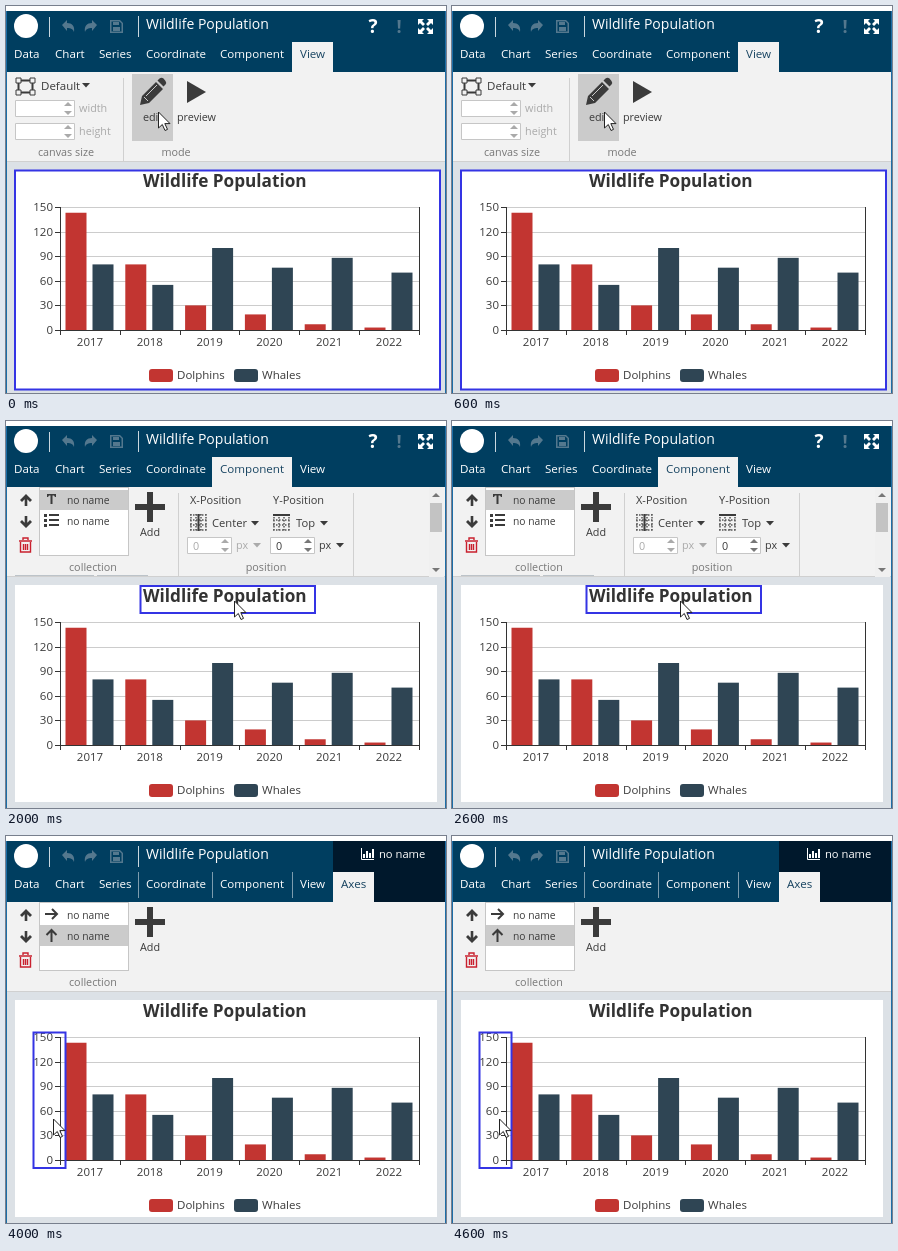
An HTML page that plays this animation: 440x387 px, repeating every 5 s.

```html
<!DOCTYPE html>
<html lang="en">
<head>
<meta charset="utf-8">
<title>Chart editor</title>
<style>
html, body { margin: 0; width: 100%; height: 100%; overflow: hidden; background: #fff; }
svg { display: block; width: 440px; height: 387px; font: 10.8px "Open Sans", "Noto Sans", sans-serif; fill: #3b3b3b; }
.tabs { font-size: 11.6px; }
.white { fill: #fff; }
.group { fill: #777; }
.off { fill: #aaa; }
.mid { text-anchor: middle; }
.field { fill: #fff; stroke: #c6c6c6; }
.line { fill: none; stroke: #3b3b3b; stroke-width: 2; }
.rule { fill: none; stroke: #d0d0d0; }
.pick { fill: none; stroke: #3434e4; stroke-width: 2; }
.hover { fill: none; stroke: #c8c8f6; stroke-width: 2; }
</style>
</head>
<body>
<svg viewBox="0 0 440 387">
  <defs>
    <path id="caret" d="M0 0h8l-4 4.5z"/>
    <path id="spin" d="M0 5l4-4 4 4zM0 10h8l-4 4z"/>
    <path id="up" d="M6 0l6 6-2 2-2.7-2.700V12H4.700V5.300L2 8 0 6z"/>
    <path id="undo" d="M0 5l5-5v3c5 0 8 3 7 9-1-3-3-4-7-4v3z"/>
    <g id="grid">
      <path d="M0 1H17M0 6H17M0 11H17M0 16H17M1 0V17M6 0V17M11 0V17M16 0V17" fill="none" stroke="#555" stroke-width="1.500" stroke-dasharray="1.500 1.500"/>
    </g>
  </defs>

  <!-- window -->
  <rect width="440" height="387" fill="#dce1e6"/>
  <rect width="440" height="5" fill="#fff"/>
  <rect y="5" width="440" height="61" fill="#003e60"/>
  <rect y="66" width="440" height="90" fill="#f2f2f2"/>
  <path d="M0 155.500H440" class="rule"/>
  <path d="M.5 5V387M439.500 5V387" fill="none" stroke="#1c6ea8"/>

  <!-- title bar -->
  <circle cx="20" cy="20" r="12" class="white"/>
  <path d="M43.500 11V31M132.500 10V31" stroke="#c9d7df"/>
  <g fill="#54788e">
    <use href="#undo" x="56" y="14"/>
    <use href="#undo" transform="matrix(-1 0 0 1 91 14)"/>
    <path d="M104 14h10l3 3v10h-13zM105.500 15.500v10h10v-8l-2-2zM107 15h6v4h-6zM107 21h7v5h-7z" fill-rule="evenodd"/>
    <text x="393" y="27" font-size="18" font-weight="700" class="mid">!</text>
  </g>
  <text x="140" y="23" font-size="14" class="white">Wildlife Population</text>
  <g data-s="0123">
    <text x="367" y="27" font-size="19" font-weight="700" class="mid white">?</text>
    <path d="M412 13h6l-2 2 3 3-2 2-3-3-2 2zM427 13v6l-2-2-3 3-2-2 3-3-2-2zM427 28h-6l2-2-3-3 2-2 3 3 2-2zM412 28v-6l2 2 3-3 2 2-3 3 2 2z" class="white"/>
  </g>
  <g data-s="4">
    <rect x="327" y="5" width="112" height="61" fill="#00182c"/>
    <path d="M355.500 12V23.500H368" fill="none" stroke="#fff"/>
    <path d="M357 18h2v4h-2zM360 15h2v7h-2zM363 17h2v5h-2zM366 13h2v9h-2z" class="white"/>
    <text x="373" y="22" font-size="11.200" class="white">no name</text>
    <path d="M132.500 36V62M206.500 36V62M286.500 36V62" stroke="#7d9cae"/>
  </g>

  <!-- tabs -->
  <rect data-s="01" x="286" y="36" width="41" height="31" fill="#f2f2f2"/>
  <rect data-s="23" x="206" y="36" width="80" height="31" fill="#f2f2f2"/>
  <rect data-s="4" x="327" y="36" width="41" height="31" fill="#f2f2f2"/>
  <g id="tabs" class="tabs"></g>

  <!-- view ribbon -->
  <g data-s="01">
    <path d="M12.500 74.500h14v12h-14z" class="line" stroke-width="1.500"/>
    <path d="M10 72h5v5h-5zM24 72h5v5h-5zM10 84h5v5h-5zM24 84h5v5h-5z" fill="#f2f2f2" stroke="#3b3b3b"/>
    <text x="35" y="84" font-size="11.500">Default</text>
    <use href="#caret" x="76" y="77"/>
    <path d="M9.500 94.500h59v16h-59zM9.500 117.500h59v16h-59z" class="field"/>
    <g class="off">
      <use href="#spin" x="58" y="95"/>
      <use href="#spin" x="58" y="118"/>
      <text x="73" y="106">width</text>
      <text x="73" y="129">height</text>
    </g>
    <g class="group mid">
      <text x="60" y="150">canvas size</text>
      <text x="170" y="150">mode</text>
    </g>
    <path d="M117.500 72V156" class="rule"/>
    <rect x="126" y="68" width="41" height="67" fill="#cbcbcb"/>
    <path d="M134 99l2-9 14-14 7 7-14 14zM151.500 74.500l2-2q2-1.500 4 0l2 2.500q1.500 2 0 3.500l-2 2z"/>
    <path d="M138 91l4 4M140 90l11-11" stroke="#cbcbcb"/>
    <path d="M181 75l19 11-19 11z"/>
    <text x="146.500" y="115" class="mid">edit</text>
    <text x="190.500" y="115" class="mid">preview</text>
  </g>

  <!-- collection ribbon -->
  <g data-s="234">
    <use href="#up" x="14" y="73"/>
    <use href="#up" transform="matrix(1 0 0 -1 14 107)"/>
    <path d="M13 120h13M17 119v-2h5v2M14.500 121v10h10v-10M17.500 123v6M19.500 123v6M21.500 123v6" fill="none" stroke="#c9202e" stroke-width="1.400"/>
    <rect x="33.500" y="66.500" width="89" height="68" class="field"/>
    <rect data-s="23" x="34" y="69" width="88" height="20" fill="#cbcbcb"/>
    <rect data-s="4" x="34" y="89" width="88" height="21" fill="#cbcbcb"/>
    <g data-s="23">
      <path d="M41 73h9v3h-1l-1-1.500h-1.500v8.500h-2v-8.500h-1.500l-1 1.500h-1z"/>
      <path d="M38 93h3v3h-3zM38 98h3v3h-3zM38 103h3v3h-3zM43 93h10v2h-10zM43 98h10v2h-10zM43 103h10v2h-10z"/>
    </g>
    <g data-s="4">
      <path d="M39 78h11M46 73l5 5-5 5M45.500 106v-11M40.500 99l5-5 5 5" class="line"/>
    </g>
    <text x="61" y="83" font-size="10.300">no name</text>
    <text x="61" y="104" font-size="10.300">no name</text>
    <path d="M141 71h6v12h12v6h-12v12h-6v-12h-12v-6h12z"/>
    <text x="144" y="115" class="mid">Add</text>
    <text x="87" y="150" class="group mid">collection</text>
  </g>

  <!-- position ribbon -->
  <g data-s="23">
    <path d="M172.500 72V156M347.500 72V156" class="rule"/>
    <path d="M9 154.500H88M91 154.500H142" stroke="#bcc3c9"/>
    <text x="184" y="83" font-size="11">X-Position</text>
    <text x="267" y="83" font-size="11">Y-Position</text>
    <use href="#grid" x="184" y="93"/>
    <use href="#grid" x="267" y="93"/>
    <path d="M192.500 93V110M267 94H284" class="line"/>
    <text x="206" y="106" font-size="11.200">Center</text>
    <text x="290" y="106" font-size="11.200">Top</text>
    <use href="#caret" x="245" y="100"/>
    <use href="#caret" x="314" y="100"/>
    <path d="M181.500 116.500h44v16h-44zM264.500 116.500h44v16h-44z" class="field"/>
    <g class="off">
      <text x="187" y="129">0</text>
      <use href="#spin" x="215" y="117"/>
      <text x="230" y="128">px</text>
      <use href="#caret" x="247" y="122"/>
    </g>
    <text x="270" y="129">0</text>
    <use href="#spin" x="298" y="117" fill="#777"/>
    <text x="313" y="128">px</text>
    <use href="#caret" x="330" y="122"/>
    <text x="260" y="150" class="group mid">position</text>
    <rect x="423" y="66" width="15" height="90" fill="#f0f0f0"/>
    <rect x="424" y="82" width="12" height="29" fill="#c3c3c3"/>
    <path d="M426 76l4-4 4 4zM426 147h8l-4 4z" fill="#777"/>
  </g>

  <!-- canvas -->
  <rect x="9" y="164" width="422" height="217" class="white"/>
  <g data-s="01">
    <rect x="9" y="164" width="425" height="219.500" class="white"/>
    <rect x="9" y="164.500" width="425" height="219" class="pick"/>
  </g>
  <text x="137" y="181" font-size="17.200" font-weight="700" fill="#333">Wildlife Population</text>
  <g id="chart" font-size="11.500"></g>
  <rect data-s="1" x="134.500" y="165" width="174.500" height="27" class="hover"/>
  <rect data-s="23" x="134.500" y="165" width="174.500" height="27" class="pick"/>
  <rect data-s="3" x="27.500" y="196.500" width="32" height="135.500" class="hover"/>
  <rect data-s="4" x="27.500" y="196.500" width="32" height="135.500" class="pick"/>

  <path id="cursor" d="M0 0V16L3.800 12.500 6.500 18.500 9 17.400 6.300 11.600H11.500Z" fill="#fff" stroke="#222"/>
</svg>
<script>
const $ = id => document.getElementById(id);
const text = (x, y, s, extra = '') => `<text x="${x}" y="${y}" ${extra}>${s}</text>`;
const rect = (x, y, w, h, fill, r = 0) => `<rect x="${x}" y="${y}" width="${w}" height="${h}" rx="${r}" fill="${fill}"/>`;
const path = (d, stroke) => `<path d="${d}" fill="none" stroke="${stroke}"/>`;

// Each tab: label, x, states in which it is open
const tabs = [['Data', 8, ''], ['Chart', 49, ''], ['Series', 93, ''], ['Coordinate', 140, ''],
  ['Component', 214, '23'], ['View', 294, '01'], ['Axes', 335, '4']];
$('tabs').innerHTML = tabs.map(([name, x, open]) =>
  (name === 'Axes' ? '' : text(x, 52, name, 'fill="#fff"')) +
  (open && text(x, 52, name, `fill="#16425f" data-s="${open}"`))).join('');

function drawChart() {
  const red = '#c23531', navy = '#2f4554', left = 54, base = 324, step = 59.8, unit = 0.82;
  const dolphins = [143, 80, 30, 19, 7, 3], whales = [80, 55, 100, 76, 88, 70];
  let out = '', ticks = '';
  for (let v = 0; v <= 150; v += 30) {
    const y = Math.round(base - v * unit) + 0.5;
    if (v) out += path(`M${left} ${y}H413`, '#ccc');
    ticks += `M${left - 5} ${y}h5`;
    out += text(47, y + 3.5, v, 'text-anchor="end"');
  }
  dolphins.forEach((n, i) => {
    const x = left + i * step;
    out += rect(x + 5.5, base - n * unit, 21, n * unit, red);
    out += rect(x + 32.5, base - whales[i] * unit, 21, whales[i] * unit, navy);
    out += text(x + 30, 340, 2017 + i, 'class="mid"');
  });
  for (let i = 0; i <= 6; i++) ticks += `M${Math.round(left + i * step) + 0.5} ${base}v5`;
  out += path(`${ticks}M54.5 201V324M413.5 201V324M54 324.5H414`, '#333');
  out += rect(143, 363, 24, 13, red, 3) + text(171, 373, 'Dolphins');
  out += rect(228, 363, 24, 13, navy, 3) + text(256, 373, 'Whales');
  $('chart').innerHTML = out;
}
drawChart();

const spots = [[152.5, 106], [228.5, 180], [228.5, 180], [47.5, 283], [47.5, 283]];
const parts = document.querySelectorAll('[data-s]');
const start = performance.now();
function frame(now) {
  const state = Math.floor(Math.max(0, now - start) % 5000 / 1000);
  for (const p of parts) p.style.display = p.dataset.s.includes(state) ? '' : 'none';
  $('cursor').setAttribute('transform', `translate(${spots[state]})`);
  requestAnimationFrame(frame);
}
frame(start);
</script>
</body>
</html>
```
